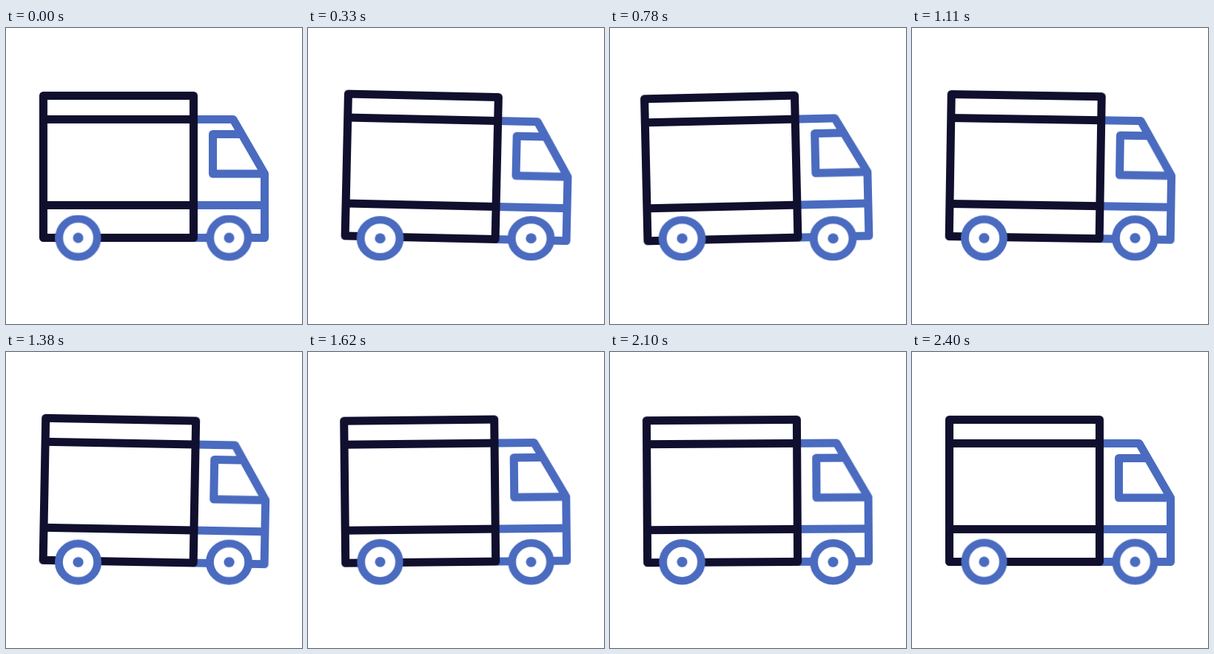
Recreate the animation shown at these times as an HTML page without scripts. Size 400x400 px, loop 2460 ms.

```html
<!DOCTYPE html>
<html lang="en">
<head>
<meta charset="utf-8">
<title>Wobbling truck</title>
<style>
  html, body { margin: 0; width: 100%; height: 100%; overflow: hidden; background: #fff; }
  svg { display: block; width: 100%; height: 100%; }

  .line { fill: none; stroke-width: 11; stroke-linecap: round; stroke-linejoin: round; }
  .cab { stroke: #4a6bbf; }
  .box { stroke: #100f2e; }

  .drop, .sway, .wheel {
    animation: 2460ms cubic-bezier(.4, 0, .6, 1) infinite;
  }
  .drop { animation-name: drop; }
  .sway { animation-name: sway; transform-origin: 200px 265px; }
  .wheel { animation-name: squash; transform-origin: 0 31px; }

  @keyframes sway {
    0%, 91.5%, 100% { transform: rotate(0deg); }
    11.4%, 50.8% { transform: rotate(1.35deg); }
    30.3%, 74.4% { transform: rotate(-1.35deg); }
  }
  /* The tyres give way at every extreme of the sway. */
  @keyframes squash {
    0%, 20.7%, 40.6%, 62.6%, 91.5%, 100% { transform: scale(1); }
    11.4%, 30.3%, 50.8%, 74.4% { transform: scale(1.03, .97); }
  }
  @keyframes drop {
    0%, 20.7%, 40.6%, 62.6%, 91.5%, 100% { transform: translateY(0); }
    11.4%, 30.3%, 50.8%, 74.4% { transform: translateY(.9px); }
  }
</style>
</head>
<body>
<svg viewBox="0 0 400 400">
  <defs>
    <g id="wheel">
      <circle r="25.7" fill="#fff" stroke="#4a6bbf" stroke-width="10.6"/>
      <circle r="7" fill="#4a6bbf"/>
    </g>
  </defs>

  <g class="drop">
    <g class="sway">
      <path class="line cab" d="M253.5 123.5H307L349.5 197V283.5H253.5M318 143.5H279.5V197H349.5M253.5 239.5H349.5"/>
      <path class="line box" d="M50.5 91.5H253.5V283.5H50.5ZM50.5 123.5H253.5M50.5 239.5H253.5"/>
    </g>
  </g>

  <g transform="translate(97.5 283.5)"><use class="wheel" href="#wheel"/></g>
  <g transform="translate(301.5 283.5)"><use class="wheel" href="#wheel"/></g>
</svg>
</body>
</html>
```
